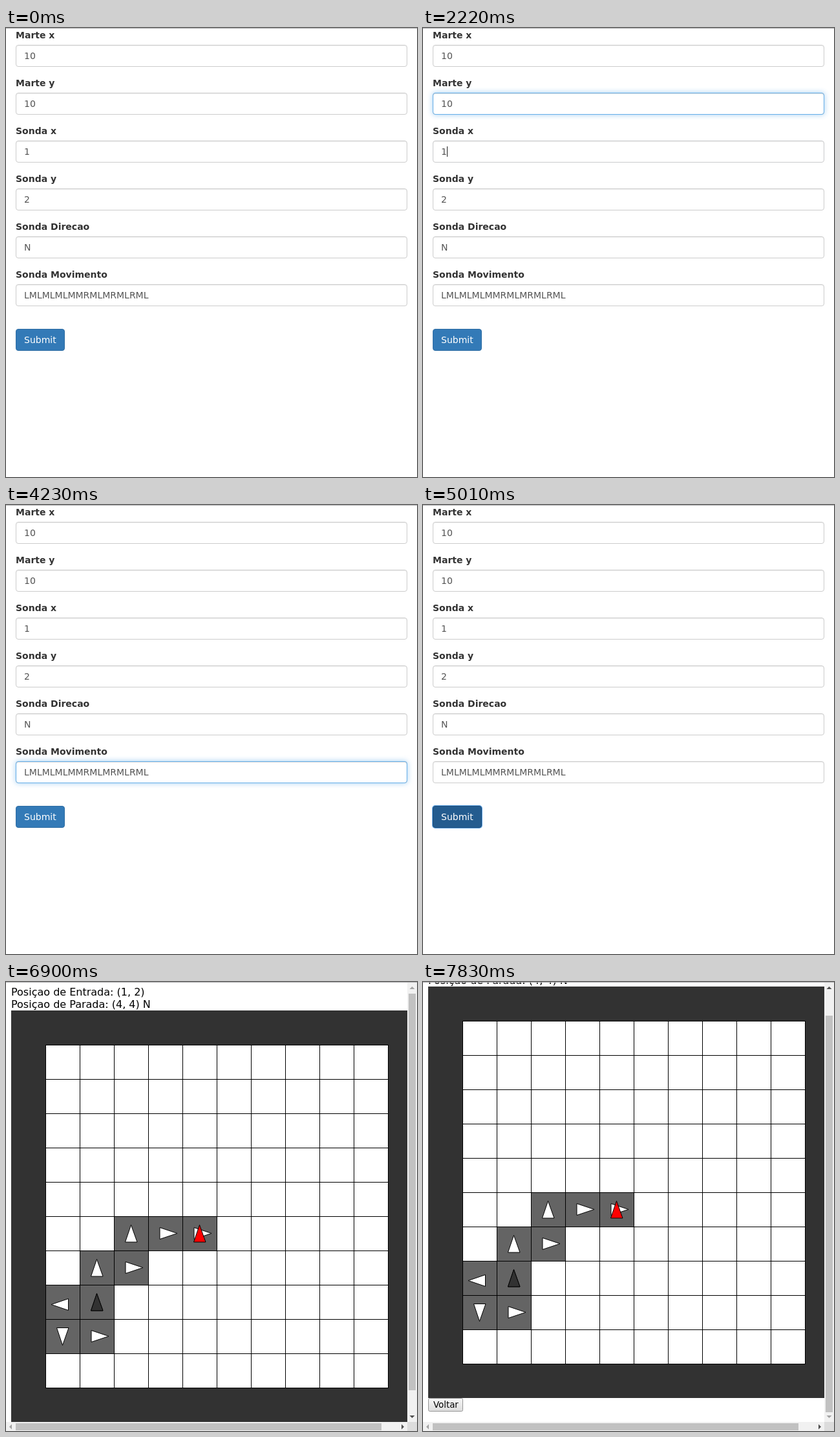
Write an HTML page that moves like this. It is 636x694 px and loops after 7.89 s.

```html
<!DOCTYPE html>
<html lang="pt">
<head>
<meta charset="utf-8">
<title>Sonda</title>
<style>
html, body { margin: 0; width: 100%; height: 100%; overflow: hidden; background: #fff; }
body { font: 14px/20px "DejaVu Sans", sans-serif; color: #333; }
#stage { position: absolute; left: 0; top: 0; width: 636px; height: 694px; overflow: hidden; }
#stage * { box-sizing: border-box; }
#form div, #form label { position: absolute; left: 15px; white-space: pre; }
#form label { font-weight: bold; }
#form .field {
  width: 606px; height: 34px; padding: 6px 12px; color: #555;
  border: 1px solid #ccc; border-radius: 4px;
  box-shadow: inset 0 1px 1px rgba(0,0,0,.075);
}
.glow {
  position: absolute; inset: -1px; border: 1px solid #66afe9; border-radius: 4px;
  box-shadow: inset 0 1px 1px rgba(0,0,0,.075), 0 0 8px rgba(102,175,233,.6); opacity: 0;
}
.caret { display: inline-block; width: 1px; height: 16px; vertical-align: -3px; background: #222; visibility: hidden; }
#form .submit {
  top: 465px; width: 76px; height: 34px; padding: 6px 12px; color: #fff;
  background: #337ab7; border: 1px solid #2e6da4; border-radius: 4px;
}
#form .submit.on { background: #245c8f; border-color: #1f4f7c; box-shadow: 0 0 0 1px #62a5e3; }
svg { position: absolute; left: 0; top: 0; display: block; }
#line { position: absolute; left: 0; top: 0; width: 636px; height: 1px; background: #b4b4b6; }
</style>
</head>
<body>
<div id="stage">
  <div id="form"></div>
  <svg id="result" width="636" height="694" font-family="'DejaVu Sans', sans-serif"></svg>
  <div id="line"></div>
</div>
<script>
const LOOP = 7890, RESULT_AT = 5070, CELL = 53;
const MOVES = "LMLMLMLMMRMLMRMLRML";
const FIELDS = [
  // label, value, focus start, focus end
  ["Marte x", "10", 1230, 1830],
  ["Marte y", "10", 1830, 2210],
  ["Sonda x", "1", 2210, 2600],
  ["Sonda y", "2", 2600, 2970],
  ["Sonda Direcao", "N", 2970, 3400],
  ["Sonda Movimento", MOVES, 3400, 4240]
];
const SUBMIT_AT = 4240, SCROLL_AT = 6910, SCROLL_MS = 180, SCROLL_PX = 37;

const form = document.getElementById("form");
const result = document.getElementById("result");
const clamp = v => Math.max(0, Math.min(1, v));
const ease = v => { v = clamp(v); return v * v * (3 - 2 * v); };

function add(parent, tag, cls, text = "") {
  const el = document.createElement(tag);
  el.className = cls;
  el.textContent = text;
  return parent.appendChild(el);
}

const fields = FIELDS.map(([label, value, from, to], i) => {
  add(form, "label", "", label).style.top = 1 + 74 * i + "px";
  const box = add(form, "div", "field", value);
  box.style.top = 26 + 74 * i + "px";
  const caret = add(box, "span", "caret");
  return { from, to, caret, glow: add(box, "span", "glow") };
});
const submit = add(form, "div", "submit", "Submit");

// Board
const rect = (x, y, w, h, fill, more = "") =>
  `<rect x="${x}" y="${y}" width="${w}" height="${h}" fill="${fill}" ${more}/>`;
const poly = (points, fill, more = "") => `<polygon points="${points}" fill="${fill}" ${more}/>`;
const text = (x, y, size, str) => `<text x="${x}" y="${y}" font-size="${size}" fill="#000">${str}</text>`;

const DIRS = "NESW", DX = [0, 1, 0, -1], DY = [1, 0, -1, 0];
const ARROWS = [
  "26,13 35.5,39.5 17,39.5",
  "44.5,26 17.5,35 17.5,17",
  "26,40 17,13 35.5,13",
  "8.5,30 35,21 35,39"
];
const cellX = x => 61.5 + CELL * x, cellY = y => 97.5 + CELL * (9 - y);
const cell = (x, y, fill) => rect(cellX(x), cellY(y), CELL, CELL, fill, 'stroke="#000"');
const arrow = ({ x, y, d }, fill) =>
  poly(ARROWS[d], fill, `stroke="#000" transform="translate(${cellX(x)} ${cellY(y)})"`);

function walk(start) {
  let { x, y, d } = start;
  const steps = [];
  for (const m of MOVES) {
    if (m === "M") steps.push({ x: x += DX[d], y: y += DY[d], d });
    else d = (d + (m === "R" ? 1 : 3)) % 4;
  }
  return { steps, end: { x, y, d } };
}

function board() {
  const start = { x: 1, y: 2, d: 0 }, { steps, end } = walk(start);
  let out = text(8, 21, 16, "Posiçao de Entrada: (1, 2)") +
    text(8, 40, 16, `Posiçao de Parada: (${end.x}, ${end.y}) ${DIRS[end.d]}`) +
    rect(8, 44, 636, 636, "#323232");
  for (let i = 0; i < 100; i++) out += cell(i % 10, Math.floor(i / 10), "#fff");
  for (const s of steps) out += cell(s.x, s.y, "#646464");
  for (const s of steps) out += arrow(s, "#fff");
  return out + arrow(start, "#323232") + arrow(end, "#f00");
}

const button = `<defs><linearGradient id="face" x2="0" y2="1">
  <stop stop-color="#f6f6f6"/><stop offset="1" stop-color="#dddddd"/></linearGradient></defs>` +
  rect(8.5, 680.5, 53, 20, "url(#face)", 'id="back" rx="2" stroke="#a0a0a0"') +
  text(16, 695, 13.333, "Voltar");

const bars = rect(621, 1, 15, 679, "#f1f1f1") + rect(0, 680, 636, 14, "#f1f1f1") +
  rect(621, 680, 15, 14, "#dcdcdc") +
  rect(623, 18, 11, 613, "#c1c1c1", 'id="thumb"') + rect(15, 682, 566, 11, "#c1c1c1") +
  poly("624.5,11 632.5,11 628.5,7", "#a3a3a3", 'id="up"') +
  poly("624.5,670 632.5,670 628.5,674", "#505050", 'id="down"') +
  poly("9,683.5 9,691.5 5,687.5", "#a3a3a3") +
  poly("612,683.5 612,691.5 616,687.5", "#505050");

result.innerHTML = rect(0, 0, 636, 694, "#fff") + `<g id="page">${board()}${button}</g>` + bars;
const [page, thumb, up, down, back] =
  ["page", "thumb", "up", "down", "back"].map(id => document.getElementById(id));

function draw(t) {
  for (const f of fields) {
    const active = t >= f.from && t < f.to;
    f.glow.style.opacity = ease((t - f.from) / 150) - ease((t - f.to) / 150);
    f.caret.style.visibility = active && (t - f.from) % 1000 < 500 ? "visible" : "hidden";
  }
  submit.classList.toggle("on", t >= SUBMIT_AT);
  result.style.display = t >= RESULT_AT ? "block" : "none";

  const p = ease((t - SCROLL_AT) / SCROLL_MS);
  page.setAttribute("transform", `translate(0 ${-Math.round(SCROLL_PX * p)})`);
  thumb.setAttribute("y", 18 + Math.round(34 * p));
  up.setAttribute("fill", p > 0 ? "#505050" : "#a3a3a3");
  down.setAttribute("fill", p < 1 ? "#505050" : "#a3a3a3");
  back.setAttribute("stroke", t >= 7830 ? "#959595" : "#a6a6a6");
}

const begin = performance.now();
function tick() {
  draw((performance.now() - begin) % LOOP);
  requestAnimationFrame(tick);
}
tick();
</script>
</body>
</html>
```
